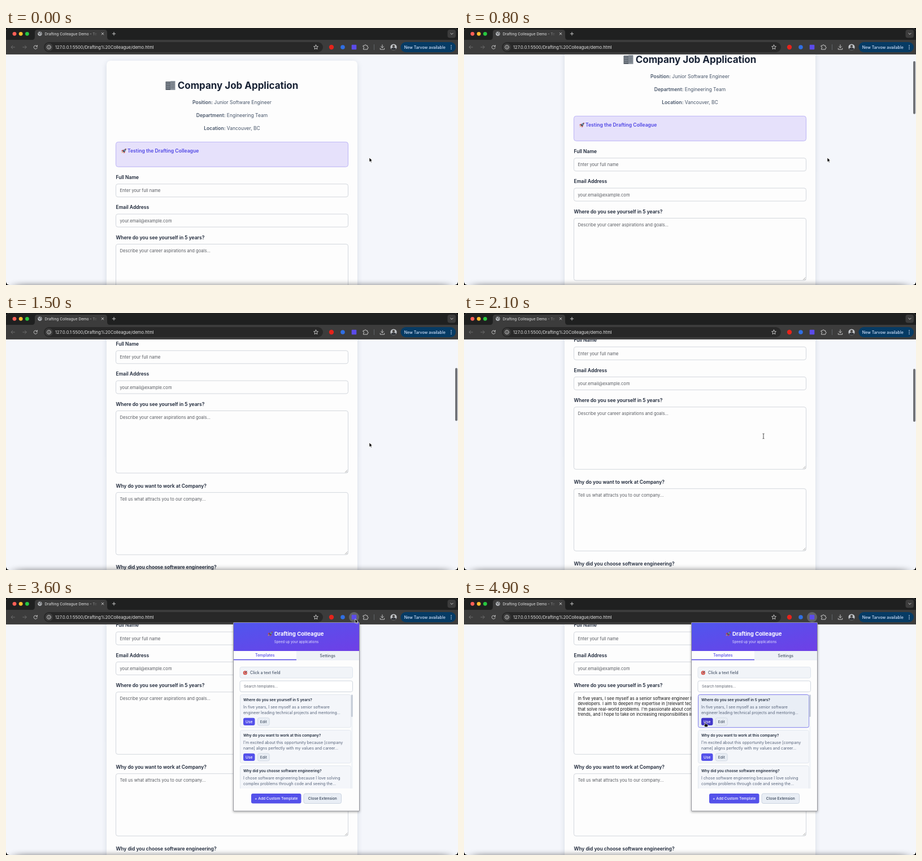
Recreate the animation shown at these times as an HTML page. Size 800x456 px, loop 5000 ms.

```html
<!DOCTYPE html>
<html lang="en">
<head>
<meta charset="utf-8">
<title>Job application demo</title>
<style>
html, body { margin: 0; width: 100%; height: 100%; overflow: hidden; background: #000; }
svg { display: block; width: 100%; height: 100%; }
text { font-family: Inter, "Liberation Sans", sans-serif; white-space: pre; }
.h1 { font-size: 16.97px; font-weight: 700; fill: #182235; }
.meta { font-size: 8.5px; fill: #475569; text-anchor: middle; }
.b { font-weight: 600; }
.label { font-size: 8.53px; font-weight: 600; fill: #1a2436; }
.hint { font-size: 7.6px; fill: #595c62; }
.typed { font-size: 7.5px; fill: #111; }
.note { font-size: 8.65px; font-weight: 600; fill: #4f46e5; }
.field { fill: #fdfdfd; stroke: #d3d7dd; }
.line { fill: none; stroke: #c7c7c7; stroke-width: 1; stroke-linecap: round; stroke-linejoin: round; }
.dim { stroke: #6d6d6d; }
.mid { text-anchor: middle; }
.ui { font-size: 7px; }
.small { font-size: 6.63px; }
</style>
</head>
<body>
<svg viewBox="0 0 800 456" preserveAspectRatio="none">
  <defs>
    <clipPath id="win"><rect width="800" height="456" rx="6"/></clipPath>
    <clipPath id="view"><rect y="47" width="800" height="409"/></clipPath>
    <clipPath id="listClip"><rect x="413" y="171" width="202" height="167"/></clipPath>
    <linearGradient id="head" x1="0" y1="0" x2="1" y2="1">
      <stop offset="0" stop-color="#4f56ee"/><stop offset="1" stop-color="#6f3fe6"/>
    </linearGradient>
    <linearGradient id="fade" gradientUnits="userSpaceOnUse" x1="148" x2="162" y1="0" y2="0">
      <stop offset="0" stop-color="#e3e3e3"/><stop offset="1" stop-color="#e3e3e3" stop-opacity="0"/>
    </linearGradient>
    <filter id="soft" x="-10%" y="-10%" width="120%" height="120%"><feGaussianBlur stdDeviation="5"/></filter>
    <filter id="drop" x="-10%" y="-10%" width="120%" height="120%"><feGaussianBlur stdDeviation="2"/></filter>
    <filter id="edge" x="-5%" y="-100%" width="110%" height="300%"><feGaussianBlur stdDeviation="10 5"/></filter>
    <g id="rocket">
      <path d="M3.2 5.2 0.6 5.9 1.9 3.6 4 3.2zM5.2 7.2 4.7 9.5 7 8.1 7.4 6z" fill="#c8443c"/>
      <path d="M2.8 6.1Q4.2 1.8 9.4 0.9 8.6 6.2 4.3 7.6z" fill="#4b5563"/>
      <path d="M7.4 1.5 9.4 0.9 8.9 2.9z" fill="#c8443c"/>
      <circle cx="6.5" cy="3.7" r="1" fill="#8fc3ea"/>
      <path d="M2.7 6.3 0.8 9.1 3.8 7.6z" fill="#f2a330"/>
    </g>
  </defs>
  <g clip-path="url(#win)">
    <rect width="800" height="456" fill="#f4f6fb"/>
    <g clip-path="url(#view)">
      <g id="page">
        <rect x="178" y="60" width="444" height="800" rx="8" fill="#64748b" opacity=".22" filter="url(#soft)"/>
        <rect x="178" y="58" width="444" height="800" rx="7" fill="#fdfdfd"/>
        <g>
          <path d="M282.5 95h9v15h-9z" fill="#5d646d"/><path d="M291 94h8.5v16H291z" fill="#8b939c"/>
          <path d="M284 97.5h6M284 100.5h6M284 103.5h6M284 106.5h6" stroke="#aab4bf" stroke-dasharray="1.5 .7"/>
          <path d="M292.3 97h6M292.3 100h6M292.3 103h6M292.3 106h6" stroke="#4d545d" stroke-dasharray="1.5 .7"/>
        </g>
        <text class="h1" x="303.7" y="107.7">Company Job Application</text>
        <text class="meta" x="400" y="134.5"><tspan class="b">Position:</tspan> Junior Software Engineer</text>
        <text class="meta" x="400" y="157.8"><tspan class="b">Department:</tspan> Engineering Team</text>
        <text class="meta" x="400" y="181"><tspan class="b">Location:</tspan> Vancouver, BC</text>
        <rect x="194.5" y="202.3" width="411" height="44" rx="4" fill="#e6e1fb" stroke="#bcb4f5"/>
        <use href="#rocket" x="203.5" y="213"/>
        <text class="note" x="215" y="221.2">Testing the Drafting Colleague</text>
        <g id="form"></g>
        <g id="answer"></g>
      </g>
      <rect id="thumb" x="795" width="4" height="94" rx="2" fill="#707277"/>
      <rect x="16" y="455" width="768" height="16" opacity=".42" filter="url(#edge)"/>
    </g>

    <rect width="800" height="47" fill="#3c3c3c"/>
    <rect y="46.4" width="800" height=".6" fill="#5b5b5b"/>
    <path d="M0 0H800V21H184Q179 21 179 16V8Q179 3 174 3H56Q51 3 51 8V16Q51 21 46 21H0Z" fill="#1f2020"/>
    <circle cx="15" cy="10.3" r="3.4" fill="#ff5f57"/>
    <circle cx="26.2" cy="10.3" r="3.4" fill="#febc2e"/>
    <circle cx="37.4" cy="10.3" r="3.4" fill="#28c840"/>
    <circle cx="60" cy="10.2" r="3.7" fill="#bdc1c6"/>
    <path d="M57 8.5 60 10l-1 2.5M60.5 7l.5 2 2 .5M61 12.5l1.5-1" stroke="#3c3c3c" fill="none"/>
    <text x="68.5" y="12.5" font-size="6.6" fill="url(#fade)">Drafting Colleague Demo - Te</text>
    <path class="line" d="M169.2 8.4l3.6 3.6m0-3.6-3.6 3.6M188.3 10.2h5.4M191 7.5v5.4"/>
    <rect x="781.5" y="3" width="14.5" height="14.5" rx="4" fill="#3c3c3c"/>
    <path class="line" d="M786.8 9.2 789 11.4l2.2-2.2"/>

    <path class="line dim" d="M15.5 34H9.2m2.6-2.8L9 34l2.8 2.8M29.8 34h6.3m-2.6-2.8 2.8 2.8-2.8 2.8"/>
    <path class="line" d="M54.8 32.2A3.1 3.1 0 1 0 55.3 35M55.4 30.7v2.2h-2.2"/>
    <rect x="67" y="25" width="494" height="18" rx="9" fill="#282828"/>
    <circle cx="76" cy="34" r="7" fill="#3c3c3c"/>
    <circle class="line" cx="76" cy="34" r="3.4"/>
    <path class="line" d="M76 33.8v1.8M76 32.2v.1"/>
    <text x="87" y="36.7" font-size="7.6" fill="#e3e3e3">127.0.0.1:5500/Drafting%20Colleague/demo.html</text>
    <path class="line" d="M548.5 30l1.1 2.6 2.8.3-2.1 1.9.6 2.8-2.4-1.5-2.4 1.5.6-2.8-2.1-1.9 2.8-.3z"/>
    <circle cx="576" cy="34" r="4.2" fill="#e5231b"/>
    <circle cx="596" cy="34" r="3.8" fill="#2f6fe4"/>
    <circle id="halo" cx="616" cy="34" r="9" fill="#616267"/>
    <rect x="611.7" y="29.7" width="8.6" height="8.6" rx="1" fill="#5b4bea"/>
    <path class="line" d="M632.5 31.2h2.2a1.4 1.4 0 0 1 2.8 0h2.2v2.3a1.4 1.4 0 0 1 0 2.8v1.7h-7.2v-2a1.3 1.3 0 0 0 0-2.6z"/>
    <path d="M651.5 29v10" stroke="#5f6368"/>
    <path class="line" d="M666 29.8v5.2m-2.4-2.2L666 35.2l2.4-2.4M662.3 36v2h7.4v-2"/>
    <circle cx="686" cy="34" r="5.6" fill="#c3c6ca"/>
    <path d="M681.5 37.3q1-2.8 4.5-2.8t4.5 2.8a5.6 5.6 0 0 1-9 0z" fill="#33363b"/>
    <circle cx="686" cy="32.3" r="2.2" fill="#4a4744"/>
    <rect x="698.5" y="25" width="97.5" height="18" rx="9" fill="#063b64"/>
    <text class="ui" x="704.8" y="36.6" fill="#d3e3fd" font-weight="500">New Tarvow available</text>
    <path d="M788 31h.01M788 34h.01M788 37h.01" stroke="#d3e3fd" stroke-width="1.7" stroke-linecap="round"/>

    <g id="popup">
      <rect x="402" y="46" width="224" height="334" fill="#000" opacity=".3" filter="url(#drop)"/>
      <rect x="402.5" y="43.5" width="223" height="334.5" rx="1" fill="#fdfdfd" stroke="#94959b"/>
      <rect x="403" y="44" width="222" height="50" fill="url(#head)"/>
      <use href="#rocket" x="462.5" y="58.5"/>
      <text x="475" y="66.7" font-size="9.6" font-weight="700" fill="#fff">Drafting Colleague</text>
      <text class="mid" x="514" y="80.3" font-size="6.1" fill="#e4e2fd">Speed up your applications</text>
      <rect x="514" y="94" width="111" height="16" fill="#eef2f7"/>
      <path d="M403 110H625" stroke="#e2e8f0" stroke-width=".6"/>
      <path d="M403 109.5H514" stroke="#4f46e5" stroke-width="1.4"/>
      <text class="ui mid" x="458.3" y="104.3" fill="#4f46e5" font-weight="500">Templates</text>
      <text class="ui mid" x="569.3" y="104.5" fill="#475569" font-weight="500">Settings</text>
      <rect x="414" y="122.5" width="199.5" height="19.5" rx="3" fill="#f1f4f8" stroke="#dfe5ed"/>
      <circle cx="423.3" cy="132.8" r="3.5" fill="#c9382f"/>
      <circle cx="423.3" cy="132.8" r="1.8" fill="none" stroke="#fff" stroke-width=".7"/>
      <path d="M423.3 132.8l3.3-3.4" stroke="#33475b" stroke-width="1"/>
      <text class="ui" x="432" y="134.8" fill="#475569" font-weight="500">Click a text field</text>
      <rect x="414" y="147" width="199.5" height="19.5" rx="3" fill="#fff" stroke="#cfd5de"/>
      <text class="small" x="421" y="159.2" fill="#5f6570">Search templates...</text>
      <g id="list" clip-path="url(#listClip)"></g>
      <rect x="610.8" y="171" width="3" height="167" fill="#f1f4f8"/>
      <rect x="610.8" y="171.5" width="3" height="39.5" rx="1.5" fill="#c6cdd8"/>
      <rect x="434" y="347" width="88.5" height="17.5" rx="3" fill="#5451ea"/>
      <text class="small mid" x="478.2" y="358.2" fill="#fff" font-weight="500">+ Add Custom Template</text>
      <rect x="527" y="347" width="66.5" height="17.5" rx="3" fill="#e9eef5" stroke="#cbd5e1"/>
      <text class="small mid" x="560.3" y="358.2" fill="#334155" font-weight="500">Close Extension</text>
    </g>

    <g id="cursor" stroke-linejoin="round">
      <path id="arrow" d="M0 0V7.8L1.8 6.2 3 8.8 4.3 8.2 3.1 5.6 5.5 5.4Z" fill="#000" stroke="#fff" stroke-width=".7"/>
      <path id="beam" d="M-1.5-4.5Q0-4.5 0-3.5V3.5Q0 4.5-1.5 4.5M1.5-4.5Q0-4.5 0-3.5M0 3.5Q0 4.5 1.5 4.5" fill="none" stroke="#222" stroke-width=".8"/>
      <path id="hand" d="M-.8-.6Q0-1.4.8-.6V2.4L3.8 3Q4.9 3.3 4.7 4.5L4 7.8H-.2L-2.6 4.7Q-2.6 3.5-.8 4.5Z" fill="#000" stroke="#fff" stroke-width=".7"/>
    </g>
  </g>
</svg>
<script>
const LOOP = 5000, STEP = 100;
const $ = id => document.getElementById(id);
const text = (cls, x, y, s, more = "") => `<text class="${cls}" x="${x}" y="${y}" ${more}>${s}</text>`;
const box = (cls, x, y, w, h, r, more = "") =>
  `<rect class="${cls}" x="${x}" y="${y}" width="${w}" height="${h}" rx="${r}" ${more}/>`;

// label baseline, field height, label, placeholder
const fields = [
  [268, 23, "Full Name", "Enter your full name"],
  [321.3, 23, "Email Address", "your.email@example.com"],
  [374.7, 110.5, "Where do you see yourself in 5 years?", "Describe your career aspirations and goals..."],
  [519.6, 110.5, "Why do you want to work at Company?", "Tell us what attracts you to our company..."],
  [664.4, 110.5, "Why did you choose software engineering?", "Share what drew you to this field..."]
];
$("form").innerHTML = fields.map(([y, h, label, hint], i) => {
  const top = y + 8.8, grip = top + h;
  return text("label", 194.5, y, label) +
    (i === 2 ? box("", 193, top - 1.5, 414, h + 3, 5, 'id="glow" fill="#c9cdfb"') : "") +
    box("field", 194.5, top, 411, h, 3.5, `id="field${i}"`) +
    text("hint", 201.5, top + 14.5, hint, `id="hint${i}"`) +
    (h > 30 ? `<path d="M600 ${grip - 1}l4.5-4.5M602.5 ${grip - 1}l2-2" stroke="#777" stroke-width=".6"/>` : "");
}).join("");

$("answer").innerHTML = [
  "In five years, I see myself as a senior software engineer leading technical projects and mentoring",
  "developers. I aim to deepen my expertise in [relevant technology] and contribute to products",
  "that solve real-world problems. I'm passionate about continuous learning and industry",
  "trends, and I hope to take on increasing responsibilities in the years ahead."
].map((s, i) => text("typed", 201.5, 397.5 + i * 9.45, s)).join("");

const templates = [
  ["Where do you see yourself in 5 years?",
    "In five years, I see myself as a senior software", "engineer leading technical projects and mentoring..."],
  ["Why do you want to work at this company?",
    "I'm excited about this opportunity because [company", "name] aligns perfectly with my values and career..."],
  ["Why did you choose software engineering?",
    "I chose software engineering because I love solving", "complex problems through code and seeing the..."]
];
$("list").innerHTML = templates.map(([title, a, b], i) =>
  `<g transform="translate(0 ${i * 63.1})">` +
  box("", 414.5, 171.5, 196, 58.3, 3, `id="card${i}"`) +
  text("small b", 420, 183.1, title, 'fill="#1e293b"') +
  text("ui", 420, 195.9, a, 'fill="#56637a"') +
  text("ui", 420, 206.2, b, 'fill="#56637a"') +
  box("", 420, 212.7, 20.5, 13.3, 3, `id="use${i}"`) +
  text("small mid", 430.2, 221.7, "Use", 'fill="#fff" font-weight="500"') +
  box("", 445.3, 212.7, 21, 13.3, 3, 'fill="#e8edf4" stroke="#cdd5e0" stroke-width=".8"') +
  text("small mid", 455.8, 221.7, "Edit", 'fill="#475569" font-weight="500"') +
  "</g>").join("");

// time, scroll
const scrolls = [[600, 0], [700, 12.2], [800, 46], [900, 86], [1000, 122], [1100, 160],
  [1200, 183], [1300, 197], [1400, 205], [1500, 210], [1700, 215], [1900, 216.7]];
// time, x, y
const moves = [[1800, 643, 230], [2000, 570, 222], [2200, 490, 215], [2400, 490, 214],
  [2600, 545, 140], [2800, 612, 55], [2900, 621, 42], [3100, 618, 37], [3700, 618, 37],
  [3900, 570, 90], [4100, 480, 180], [4300, 432, 218], [4400, 427, 221]];

function at(keys, t, k) {
  const i = keys.findIndex(key => key[0] > t);
  if (i === 0) return keys[0][k];
  if (i < 0) return keys[keys.length - 1][k];
  const a = keys[i - 1], b = keys[i];
  return a[k] + (b[k] - a[k]) * (t - a[0]) / (b[0] - a[0]);
}
const show = (id, on) => $(id).style.display = on ? "" : "none";
const paint = (id, fill, stroke) => {
  $(id).setAttribute("fill", fill);
  if (stroke) $(id).setAttribute("stroke", stroke);
};

function draw(t) {
  const scroll = at(scrolls, t, 1), x = at(moves, t, 1), y = at(moves, t, 2);
  $("page").setAttribute("transform", `translate(0 ${-scroll})`);
  $("thumb").setAttribute("y", 48 + scroll * 0.2354);
  $("thumb").style.opacity = t < 700 ? 0 : Math.max(0, Math.min(1, (2500 - t) / 300));

  const open = t >= 3300, focus = t >= 2300 && !open, filled = t >= 4600;
  show("popup", open);
  show("halo", open || t >= 3000);
  show("glow", focus);
  $("field2").style.cssText = focus ? "fill:#ebf6fd;stroke:#8f95f2" : "";
  show("hint2", !filled);
  show("answer", filled);

  let onUse = false;
  templates.forEach((_, i) => {
    const top = 171.5 + i * 63.1;
    const over = open && x > 414 && x < 610 && y > top && y < Math.min(338, top + 58);
    const press = over && x > 420 && x < 440.5 && y > top + 41 && y < top + 54.5;
    paint("card" + i, over ? "#e9eef6" : "#f4f6fa", over ? "#7d7bea" : "#e2e7ee");
    paint("use" + i, press ? "#4338ca" : "#5451ea");
    onUse = onUse || press;
  });
  const inField = !open && x > 195 && x < 605 && y > 383.5 - scroll && y < 494 - scroll;
  show("hand", onUse);
  show("beam", inField);
  show("arrow", !onUse && !inField);
  $("cursor").setAttribute("transform", `translate(${x} ${y})`);
}

const start = performance.now();
function tick(now) {
  const t = Math.max(0, now - start) % LOOP;
  draw(Math.floor(t / STEP) * STEP);
  requestAnimationFrame(tick);
}
draw(0);
requestAnimationFrame(tick);
</script>
</body>
</html>
```
